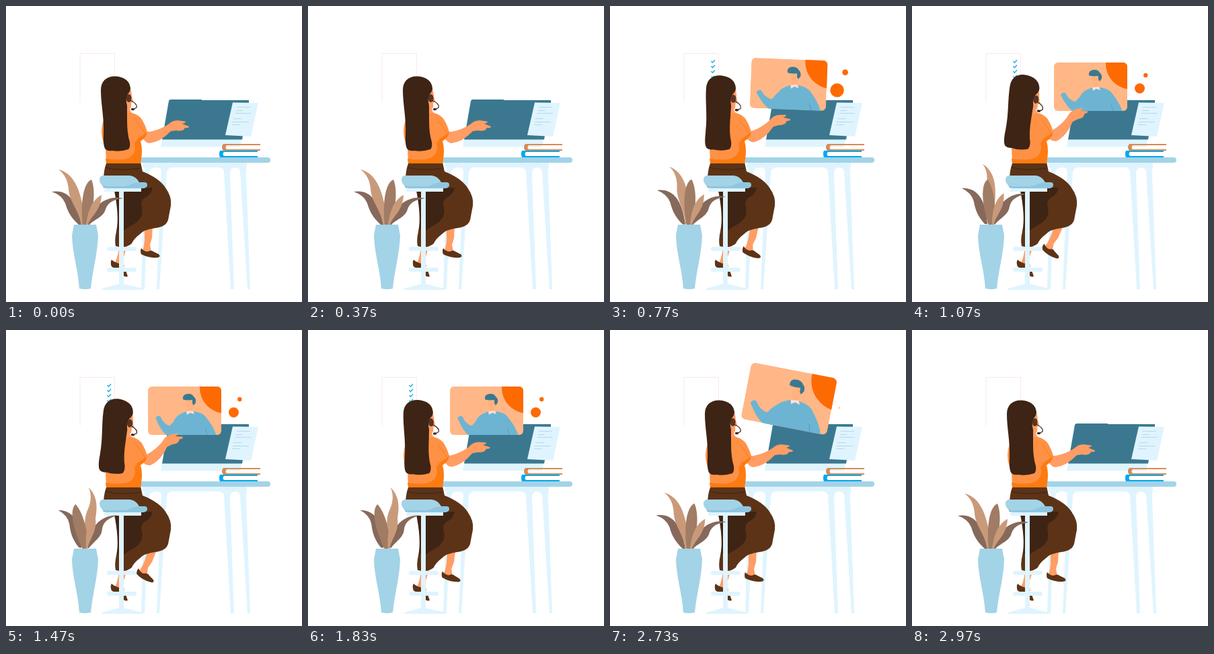
An HTML page that plays this animation: 440x440 px, repeating every 3.01 s.

```html
<!DOCTYPE html>
<html>
<head>
<meta charset="utf-8">
<style>
html, body { margin: 0; width: 100%; height: 100%; overflow: hidden; background: #fff; }
svg { display: block; width: 100vw; height: 100vh; }
.pale { fill: #dff4fe; }
.blue { fill: #a3d3e7; }
.skin { fill: #ff9d64; }
.hair { fill: #3e2414; }
.brown { fill: #5c3317; }
.light { fill: #c99a7a; }
.dark { fill: #86695a; }
.line { fill: none; }
</style>
</head>
<body>
<svg viewBox="0 0 440 440">
  <defs><clipPath id="frame"><rect x="211" y="84" width="109" height="72" rx="6"/></clipPath></defs>

  <!-- wall list -->
  <path class="line" stroke="#fde6ea" d="M110 143V70.5H161.5V104"/>
  <g id="checks" class="line" stroke="#1fb0ea" stroke-width="1.5"></g>

  <!-- table -->
  <path class="pale" d="M203 232H358V238Q357 241 357 250L363 421H359L348 246Q347 240 340 240Q333 240 333 250L339 421H334L324 246Q323 240 316 240H247Q240 240 239 248L228 421H224L231 246Q231 240 224 240Q214 240 213 247L206 421H201L206 240H203Z"/>
  <rect class="blue" x="190" y="225" width="203" height="8" rx="4"/>

  <!-- monitor, sheet and books -->
  <path class="pale" d="M232 198H350L348 209.500H230Z"/>
  <path fill="#3b7890" d="M245 139H291V140H361V144L351 198.500H232L242 141Q243 139 245 139Z"/>
  <path class="pale" d="M337 143.500L375 144L364 194L326 192Z"/>
  <path class="line" stroke="#b5d9e8" d="M343 150.500H363M342 155.500H352M341 159.500H364M338 167.500H350M337 172.500H361M336 176.500H348"/>
  <path fill="#d88a55" d="M323 205H378V207H328Q325 210 328 213H378V215H323Q319 210 323 205Z"/>
  <path fill="#00a9ee" d="M318 215H374V217H324Q321 220 324 223H374V225H318Q316 220 318 215Z"/>

  <!-- call window -->
  <g id="card" clip-path="url(#frame)">
    <path fill="#ffb787" d="M211 84H320V156H211Z"/>
    <circle cx="326" cy="86" r="38" fill="#fd6a02"/>
    <path id="wave" fill="#6db4d2" d="M219 134Q222 129 226 131Q232 141 242 142Q247 133 257 126L262 150Q254 158 241 157Q231 153 219 134Z"/>
    <path fill="#6db4d2" d="M244 157Q246 130 261 124L268 121H280Q294 123 299 132Q308 143 313 157Z"/>
    <path fill="#ffb27d" d="M267 103H279V113Q278 119 277 118V121Q272 124 270 121Z"/>
    <path fill="#fde0dd" d="M268 121L278 120L280 125L274 123L269 126Z"/>
    <path fill="#3b7890" d="M263 103Q262 96 269 95Q276 94 279 99Q283 102 282 108L279 112L277 109V104Q266 105 263 103Z"/>
    <path class="line" stroke="#539fbf" d="M296 146L299 156"/>
  </g>
  <g id="dots" fill="#fd6a02"><circle cx="338.500" cy="122.500" r="7.500"/><circle cx="347.300" cy="103" r="3.200"/></g>

  <!-- woman -->
  <path class="skin" d="M168 350H182L174 376L176 388L162 382Q168 370 168 350Z"/>
  <path class="brown" d="M157 377Q161 381 169 383Q177 388 181 402Q176 404 170 397L164 389Q156 390 156 384Q155 380 157 377Z"/>
  <g id="foot">
    <path class="skin" d="M205 326H218L217 345L214 355L216 366L203 364Q208 350 205 326Z"/>
    <path class="brown" d="M201 360Q205 365 211 365Q216 362 219 365L227 369Q231 373 225 374Q212 375 201 369Q199 364 201 360Z"/>
  </g>
  <path class="brown" d="M150 232H200L203 246Q228 256 237 270Q247 284 245 297L241 318Q238 328 222 330Q205 332 198 340Q190 346 187 353Q178 361 163 357Q161 348 164 335Q169 312 160 270H145Q144 244 150 232Z"/>
  <path class="hair" d="M161 270H218Q216 281 206 285Q199 290 202 300Q205 314 192 323Q183 328 176 333H165Q169 312 161 270Z"/>
  <path class="line" stroke="#3e2414" d="M148 240Q170 246 200 241"/>

  <g id="arm">
    <path class="skin" d="M198 185L213 187Q229 184 241 176Q247 170 255 170L266 171.500Q269 173 262 175L272 179Q272 182 266 181Q264 187 253 185L245 186Q230 202 213 204Q204 203 198 185Z"/>
  </g>
  <path class="skin" d="M177 148L188 160L184 170L170 168Z"/>
  <path fill="#ff9145" d="M160 160L181 158Q194 159 201 167Q208 178 210 188Q207 195 199 199Q203 210 200 234H149L148 210Q138 190 145 170Z"/>
  <path fill="#fd7b10" d="M148 227Q172 231 184 225Q195 217 191 204Q193 199 210 188Q208 196 200 201Q204 214 200 234H149Z"/>
  <path class="line" stroke="#fd7b10" d="M193 171Q202 180 207 190L194 199"/>
  <g id="head">
    <path class="skin" d="M174 112L183 118Q187 127 187 134L189 142L186 144Q187 151 184 153Q188 159 178 160Z"/>
    <ellipse cx="182.500" cy="137" rx="4" ry="6" fill="#593525"/>
    <path class="line" stroke="#46291a" stroke-width="1.300" d="M184 140Q196 145 194 151L189 153.500"/>
    <ellipse cx="188.500" cy="153.500" rx="2.800" ry="1.800" fill="#46291a"/>
  </g>
  <path id="hair" class="hair" d="M163 104.500C149 104 141 112 141 125C141 146 146 165 145 190Q144 209 148 213Q151 216 158 215Q170 217 182 213Q185 210 184 202Q180 190 180 170V148Q177 138 181 131Q185 127 185 122Q183 106 163 104.500Z"/>

  <!-- stool -->
  <path class="pale" d="M146 270H201V276H175V358H191Q194 358 194 361T191 364H175V389H191Q194 389 194 392T191 395H175V413L203 420V422H143V420L168 413V395H153Q150 395 150 392T153 389H168V364H153Q150 364 150 361T153 358H168V276H146Z"/>
  <path fill="#8fc6df" d="M142 262H206Q210 262 210 266T205 271H150Q142 270 142 262Z"/>
  <path class="blue" d="M144 252H184Q193 253 198 262Q189 263 184 266Q180 268 172 268H148Q139 266 139 258Q139 253 144 252Z"/>

  <!-- plant -->
  <path class="leaf dark" data-turn="10.700" d="M68 276C92 272 106 290 112 325H108C96 314 92 306 88 293Q83 281 68 276Z"/>
  <path class="leaf dark" data-turn="-12" d="M174 286C150 280 128 297 120 325H124C130 318 145 314 148 302C152 291 160 288 174 286Z"/>
  <path class="leaf light" data-turn="30" d="M78 243C102 249 113 275 118 325H112C108 302 94 291 93 272Q91 252 78 243Z"/>
  <path class="leaf" data-turn="-21" fill="#a07c64" d="M127 258C134 275 130 305 121 325H114C111 300 113 264 127 258Z"/>
  <path class="leaf light" data-turn="-12" d="M142 281C127 289 122 305 119 325H122C126 312 141 305 142 281Z"/>
  <path class="blue" d="M101 325H134L137 341C136 370 129 390 126 420Q118 422 109 420C107 390 99 370 98 341Z"/>
</svg>
<script>
const LOOP = 3010;
const $ = id => document.getElementById(id);
const leaves = document.querySelectorAll('.leaf');
const mix = (a, b, u) => a + (b - a) * u;

// Eased value through pairs of time and value
function key(t, ...k) {
  if (t <= k[0]) return k[1];
  for (let i = 2; i < k.length; i += 2) {
    if (t < k[i]) {
      const u = (t - k[i - 2]) / (k[i] - k[i - 2]);
      return mix(k[i - 1], k[i + 1], (1 - Math.cos(Math.PI * u)) / 2);
    }
  }
  return k[k.length - 1];
}

const put = (el, transform) => el.setAttribute('transform', transform);
const turn = (el, angle, x, y) => put(el, `rotate(${angle} ${x} ${y})`);

const checks = [82, 89.5, 97, 104.5].map(y => {
  const p = document.createElementNS('http://www.w3.org/2000/svg', 'path');
  p.setAttribute('d', `M150.5 ${y}l2 2.2l3.500 -4`);
  p.setAttribute('pathLength', 1);
  $('checks').append(p);
  return p;
});

function draw(t) {
  const sway = key(t, 370, 0, 1625, 1, 1675, 1, 2930, 0);
  leaves.forEach(l => turn(l, l.dataset.turn * sway, 118, 325));
  turn($('wave'), 11 * sway, 240, 150);

  const lean = key(t, 400, 0, 1230, 1, 2060, 0);
  turn($('hair'), 10 * lean, 178, 150);
  turn($('head'), 7.5 * lean, 167, 153);
  turn($('arm'), -23 * lean, 205, 197);
  turn($('foot'), 23 * lean, 217, 345);

  const grow = key(t, 385, 0, 560, 1, 2785, 1, 2960, 0);
  const lift = key(t, 570, 1, 850, 0, 2500, 0, 2785, 1);
  const x = mix(290, 265.5 + 0.7 * lift, grow), y = mix(170, 120 - 19.6 * lift, grow);
  put($('card'), `translate(${x} ${y}) rotate(${12 * lift}) scale(${grow * (1 + 0.21 * lift)}) translate(-265.5 -120)`);

  const pop = key(t, 480, 0, 800, 1.4, 1000, 1, 2330, 1, 2500, 1.4, 2780, 0);
  put($('dots'), `translate(341 115) scale(${pop}) translate(-341 -115)`);

  checks.forEach((p, i) => {
    const end = key(t, 460 + 30 * i, 0, 760 + 30 * i, 1);
    const start = key(t, 1980 + 40 * i, 0, 2230 + 40 * i, 1);
    p.style.display = end > start ? '' : 'none';
    p.setAttribute('stroke-dasharray', `0 ${start} ${end - start} 2`);
  });
}

function tick() {
  draw(performance.now() % LOOP);
  requestAnimationFrame(tick);
}
tick();
</script>
</body>
</html>
```
